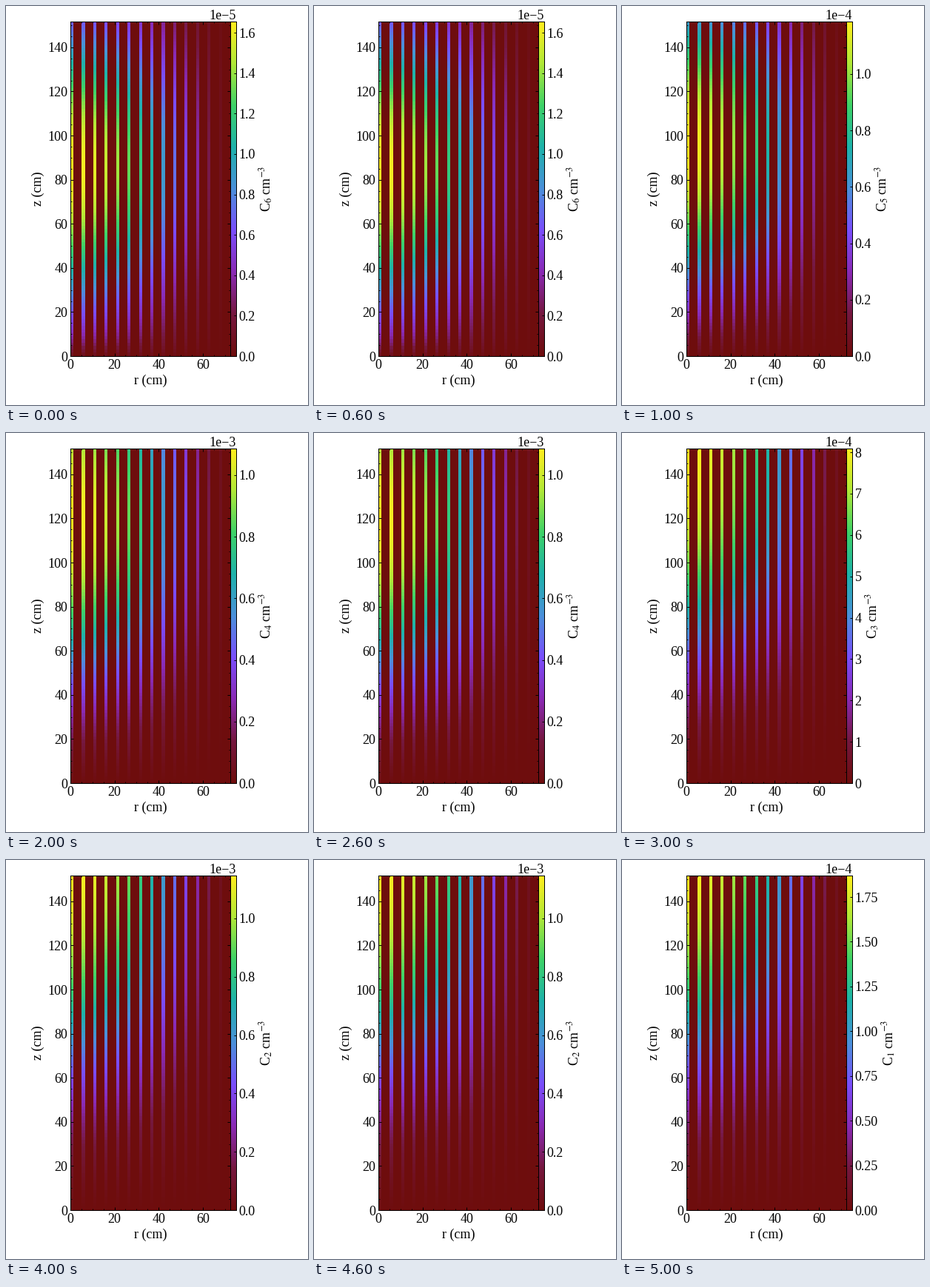
A matplotlib script that plays this animation: 408 px wide and 539 px high, repeating every 6 s.

```python
import numpy as np
import matplotlib.pyplot as plt
from matplotlib.animation import FuncAnimation
from matplotlib.colors import LinearSegmentedColormap
from matplotlib.ticker import AutoMinorLocator, MultipleLocator

W, H, DPI = 408, 539, 72
R_MAX, Z_MAX = 72.5, 151.7
ROWS, CHANNELS = 100, 14
PITCH = R_MAX / CHANNELS
FUEL = 0.267 * PITCH

plt.rcParams.update({
    "font.family": "Liberation Serif",
    "font.size": 18,
    "mathtext.fontset": "stix",
    "axes.linewidth": 1,
    "xtick.direction": "in",
    "ytick.direction": "in",
})

CMAP = LinearSegmentedColormap.from_list("density", [
    "#6e0d0d", "#75183f", "#8a2ab4", "#7a4efb", "#4b90da",
    "#1eb2aa", "#3ed268", "#b0e838", "#ffed1e"], N=512)

# decay per cm of upward flow and peak density, for groups 6 down to 1
DECAY = [0.15, 0.057, 0.015, 0.0048, 0.0015, 0.0006]
PEAK = [1.655e-5, 1.186e-4, 1.086e-3, 8.09e-4, 1.147e-3, 1.87e-4]


def bessel_j0(x):
    t = (np.arange(64) + 0.5) * np.pi / 64
    return np.cos(np.outer(x, np.sin(t))).mean(axis=1)


def axial(decay):
    """Density along a channel: bell-shaped source, carried up and decaying."""
    dz = Z_MAX / ROWS
    z = (np.arange(ROWS) + 0.5) * dz
    source = np.exp(-0.5 * ((z - 80) / 48) ** 2)
    growth = np.cumsum(source * np.exp(decay * z))
    density = growth * np.exp(-decay * z)
    return density / density.max()


def field(decay):
    """Fuel channels in the even columns, empty moderator in the odd ones."""
    radial = bessel_j0(2.405 * (np.arange(CHANNELS) + 0.5) / CHANNELS)
    grid = np.zeros((ROWS, 2 * CHANNELS))
    grid[:, ::2] = np.outer(axial(decay), radial / radial[0])
    return grid


def add_axes(x0, x1, y0=21, y1=473):
    return fig.add_axes([x0 / W, 1 - y1 / H, (x1 - x0) / W, (y1 - y0) / H])


fig = plt.figure(figsize=(W / DPI, H / DPI), dpi=DPI, facecolor="white")
ax = add_axes(87, 303)
cax = add_axes(303, 311)

left = np.arange(CHANNELS) * PITCH
r_edges = np.append(np.column_stack([left, left + FUEL]).ravel(), R_MAX)
z_edges = np.linspace(0, Z_MAX, ROWS + 1)
mesh = ax.pcolormesh(r_edges, z_edges, field(DECAY[0]), cmap=CMAP,
                     vmin=0, vmax=1, linewidth=0)
ax.set(xlim=(0, R_MAX), ylim=(0, Z_MAX), xlabel="r (cm)", ylabel="z (cm)")
for axis in (ax.xaxis, ax.yaxis):
    axis.set_major_locator(MultipleLocator(20))
    axis.set_minor_locator(AutoMinorLocator(4))
ax.tick_params(which="major", length=4, width=1, top=True, right=True)
ax.tick_params(which="minor", length=2, width=0.8, top=True, right=True)
ax.set_axisbelow(False)

bar = cax.imshow(np.linspace(0, 1, 512)[:, None], cmap=CMAP, vmin=0, vmax=1,
                 origin="lower", aspect="auto", extent=(0, 1, 0, 1))
cax.set_xticks([])
cax.yaxis.tick_right()
cax.yaxis.set_label_position("right")
cax.yaxis.set_offset_position("right")
cax.tick_params(length=3.5, width=1)
cax.ticklabel_format(axis="y", style="sci", scilimits=(0, 0))


def update(i):
    mesh.set_array(field(DECAY[i]))
    bar.set_extent((0, 1, 0, PEAK[i]))
    cax.set_ylim(0, PEAK[i])
    cax.set_ylabel(rf"C$_{6 - i}$ cm$^{{-3}}$")
    return mesh, bar


anim = FuncAnimation(fig, update, frames=len(PEAK), interval=1000,
                     init_func=lambda: update(0), repeat=True,
                     repeat_delay=0, blit=False)
plt.show()
```
